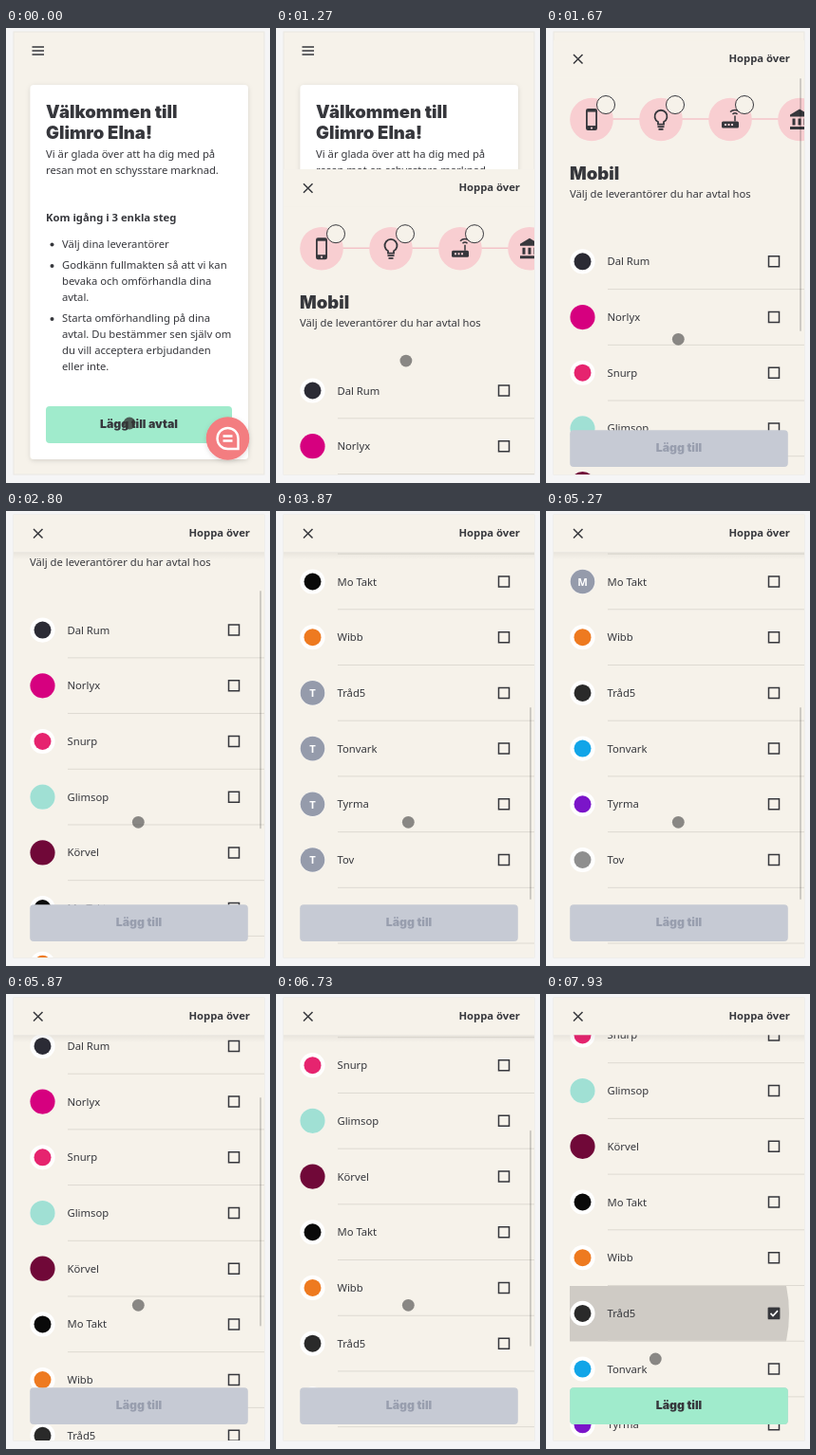
An HTML page for the animation above (8 s loop, 278x480 px).

```html
<!DOCTYPE html>
<html lang="sv">
<head>
<meta charset="utf-8">
<title>Lägg till avtal</title>
<style>
  html, body { margin: 0; width: 100%; height: 100%; overflow: hidden; background: #f5f5f6; }
  svg { display: block; width: 100%; height: 100%; }
  text { font: 11.25px "Noto Sans", "Open Sans", sans-serif; fill: #36373c; }
  .bold { font-weight: 700; }
  .title { font: 900 18.5px Inter, sans-serif; }
  .action { font: 900 12.3px Inter, sans-serif; text-anchor: middle; }
  .letter { font-weight: 700; text-anchor: middle; fill: #fff; }
</style>
</head>
<body>
<svg viewBox="0 0 278 480">
  <defs>
    <clipPath id="screen"><rect x="8" y="4" width="264" height="467"/></clipPath>
    <clipPath id="rowClip"><rect x="25" y="-29" width="247" height="58.5"/></clipPath>
    <linearGradient id="shade" x2="0" y2="1">
      <stop stop-color="#000" stop-opacity=".06"/>
      <stop offset="1" stop-color="#000" stop-opacity="0"/>
    </linearGradient>
    <filter id="soft" x="-20%" y="-20%" width="140%" height="140%">
      <feDropShadow dx="0" dy="1.5" stdDeviation="2.5" flood-opacity=".13"/>
    </filter>
  </defs>
  <rect x="8" y="4" width="264" height="467" fill="#f6f2ea" stroke="#e9e7e2"/>
  <g clip-path="url(#screen)">
    <g id="welcome"></g>
    <g id="picker">
      <rect x="8" y="4" width="264" height="467" fill="#f6f2ea"/>
      <g id="content"></g>
      <rect id="bar" x="267" width="2" rx="1" fill="#000" fill-opacity=".16"/>
      <g id="header"></g>
      <g id="footer"></g>
    </g>
  </g>
  <circle id="cursor" r="6.4" fill="#333"/>
</svg>
<script>
const LOOP = 8000, PITCH = 58.7, FIRST_ROW = 237.3, CHOSEN = 7, MAX_SCROLL = 456.3;
const INK = '#36373c', PAPER = '#f6f2ea', MINT = '#a0ebcc', PINK = '#f8ced1', RULE = '#dedad2';
const $ = id => document.getElementById(id);

function add(parent, tag, attrs = {}, text) {
  const el = document.createElementNS('http://www.w3.org/2000/svg', tag);
  for (const k in attrs) el.setAttribute(k, attrs[k]);
  if (text) el.textContent = text;
  return parent.appendChild(el);
}
const label = (parent, x, y, text, cls = '') => add(parent, 'text', { x, y, class: cls }, text);
const box = (parent, x, y, width, height, fill, rx = 0) =>
  add(parent, 'rect', { x, y, width, height, fill, rx });
const disc = (parent, cx, cy, r, fill) => add(parent, 'circle', { cx, cy, r, fill });
const line = (parent, d, stroke = INK, width = 1.5) =>
  add(parent, 'path', { d, stroke, 'stroke-width': width, fill: 'none' });
const move = (el, x, y) => el.setAttribute('transform', `translate(${x} ${y})`);
function group(parent, x = 0, y = 0) {
  const g = add(parent, 'g');
  move(g, x, y);
  return g;
}

const steps = [
  ['Välj dina leverantörer'],
  ['Godkänn fullmakten så att vi kan', 'bevaka och omförhandla dina', 'avtal.'],
  ['Starta omförhandling på dina', 'avtal. Du bestämmer sen själv om',
   'du vill acceptera erbjudanden', 'eller inte.'],
];

function buildWelcome(g) {
  line(g, 'M27.5 20h12.5M27.5 24h12.5M27.5 28h12.5', INK, 1.4);
  box(g, 25.5, 60, 229.5, 395, '#fff', 4).setAttribute('filter', 'url(#soft)');
  label(g, 42, 95, 'Välkommen till', 'title');
  label(g, 42, 117, 'Glimro Elna!', 'title');
  label(g, 42, 137, 'Vi är glada över att ha dig med på');
  label(g, 42, 154, 'resan mot en schysstare marknad.');
  label(g, 42, 204, 'Kom igång i 3 enkla steg', 'bold');
  let y = 232;
  for (const step of steps) {
    disc(g, 48.5, y - 3.5, 2, INK);
    for (const text of step) {
      label(g, 59, y, text);
      y += 16.8;
    }
    y += 5.6;
  }
  box(g, 42, 399, 196, 39, MINT, 4);
  label(g, 140, 422, 'Lägg till avtal', 'action');
  const chat = group(g, 233.5, 433);
  disc(chat, 0, 0, 22.8, '#f37d80').setAttribute('filter', 'url(#soft)');
  line(chat, 'M11 11H0A11 11 0 1 1 11 0ZM-5 -2.5H5M-5 2.5H5', '#fff', 2.4);
}

const icons = [
  function phone(g) {
    box(g, -6, -11.5, 12, 23, INK, 2.2);
    box(g, -4.2, -8, 8.4, 14.5, PINK);
    disc(g, 0, 9, 1.1, PINK);
  },
  function bulb(g) {
    line(g, 'M-3 5V2.5A6.5 6.5 0 1 1 3 2.5V5ZM-3.5 7.5H3.5M-2.5 10.2H2.5', INK, 1.8);
  },
  function router(g) {
    box(g, -9, 2, 18, 7, INK, 1.5);
    line(g, 'M5 2V-4M2.5 -5.5A3.6 3.6 0 0 1 7.5 -5.5M0 -8A7 7 0 0 1 10 -8');
    line(g, 'M-6 5.5H3', PINK, 2).setAttribute('stroke-dasharray', '2 1.5');
  },
  function bank(g) {
    add(g, 'path', { d: 'M-10 -5L0 -11L10 -5V-3H-10Z', fill: INK });
    line(g, 'M-6 -1V6M0 -1V6M6 -1V6M-10 9H10', INK, 3);
  },
];

const BADGE = 13.1, SMALL = 9;
const providers = [
  ['Dal Rum', '#2b2b35', SMALL],
  ['Norlyx', '#d6007f', BADGE],
  ['Snurp', '#e6246f', SMALL],
  ['Glimsop', '#a0e0d4', BADGE],
  ['Körvel', '#700838', BADGE],
  ['Mo Takt', '#0a0a0a', SMALL],
  ['Wibb', '#ee7a20', SMALL],
  ['Tråd5', '#2a2a2a', SMALL],
  ['Tonvark', '#12a5e8', SMALL],
  ['Tyrma', '#7b15c9', SMALL],
  ['Tov', '#8f8f8f', SMALL],
];
// the last badges load late, one of them reloads
const isLoading = (i, t) => i > 6 ? t < 4440 : i === 5 && t > 5100 && t < 5600;
let ripple, tick;

function buildRow(row, [name, color, r], i) {
  if (i === CHOSEN) {
    const clip = add(row, 'g', { 'clip-path': 'url(#rowClip)' });
    ripple = disc(clip, 116, 0, 0, '#000');
    ripple.setAttribute('fill-opacity', .16);
  }
  disc(row, 38.5, 0, BADGE, '#fff');
  disc(row, 38.5, 0, r, color);
  const initial = group(row);
  disc(initial, 38.5, 0, BADGE - .3, '#959bab');
  label(initial, 38.5, 4.2, name[0], 'letter');
  label(row, 64.5, 4, name);
  line(row, 'M234.5 -5.5h11v11h-11z');
  line(row, 'M65 29.3H272', RULE, 1);
  if (i === CHOSEN) {
    tick = group(row);
    box(tick, 233.8, -6.2, 12.4, 12.4, INK, 1);
    line(tick, 'M236.5 0L239 2.6L244 -2.8', '#fff', 1.6);
  }
  return initial;
}

function buildContent(g) {
  line(g, 'M48 87H272', '#f4c3c8');
  icons.forEach((draw, i) => {
    const topic = group(g, 48 + 73 * i, 87.5);
    disc(topic, 0, 0, 22.8, PINK);
    draw(topic);
    disc(topic, 15, -15.5, 9.5, PAPER).setAttribute('stroke', INK);
  });
  label(g, 25, 150.5, 'Mobil', 'title');
  label(g, 25, 170, 'Välj de leverantörer du har avtal hos');
  const initials = providers.map((p, i) => buildRow(group(g, 0, FIRST_ROW + PITCH * i), p, i));
  line(g, `M65 ${FIRST_ROW + PITCH * providers.length + 29.3}H272`, RULE, 1);
  return initials;
}

function button(parent, fill, color) {
  const g = group(parent);
  box(g, 25.2, 415.2, 229.6, 38.8, fill, 4);
  label(g, 140, 438, 'Lägg till', 'action').style.fill = color;
  return g;
}

buildWelcome($('welcome'));
const initials = buildContent($('content'));
const shadow = box($('header'), 8, 43, 264, 8, 'url(#shade)');
box($('header'), 8, 4, 264, 39.3, PAPER);
line($('header'), 'M29 19l9.5 9.5M38.5 19L29 28.5');
label($('header'), 192.5, 27.3, 'Hoppa över', 'bold');
button($('footer'), '#c6cad4', '#989eae');
const active = button($('footer'), MINT, INK);

const linear = p => p;
const smooth = p => p * p * (3 - 2 * p);
const easeOut = p => 1 - (1 - p) ** 4;
const ramp = (t, start, length, ease = linear) =>
  ease(Math.min(1, Math.max(0, (t - start) / length)));

function scrollAt(t) {
  const down = 115 * ramp(t, 2330, 800, easeOut) + 430 * ramp(t, 3600, 800, easeOut);
  const up = 350 * ramp(t, 5270, 860, smooth);
  const back = 205 * ramp(t, 6130, 800, smooth);
  return Math.min(MAX_SCROLL, down) - up + back;
}

// the scroll bar shows at once and fades when its time is over
const pulse = (t, from, to) => ramp(t, from - 70, 70) - ramp(t, to, 250);

function render(t) {
  const scroll = scrollAt(t);
  move($('picker'), 0, 467 * (1 - ramp(t, 1000, 1070, easeOut)));
  move($('content'), 0, -scroll);
  shadow.style.opacity = Math.min(1, scroll / 30);

  $('bar').setAttribute('y', 44 + .357 * scroll);
  $('bar').setAttribute('height', 267 - .14 * scroll);
  $('bar').style.opacity =
    pulse(t, 1600, 1800) + pulse(t, 2400, 3150) + pulse(t, 3650, 4650) + pulse(t, 5270, 7280);

  initials.forEach((el, i) => { el.style.display = isLoading(i, t) ? '' : 'none'; });
  ripple.setAttribute('r', 140 * ramp(t, 7650, 280));
  tick.style.display = t >= 7730 ? '' : 'none';
  active.style.opacity = ramp(t, 7720, 180);

  const toList = ramp(t, 870, 600, smooth);
  const toRow = ramp(t, 6780, 290, smooth);
  const toButton = ramp(t, 7720, 210, smooth);
  move($('cursor'), 130 + 9.3 * toList - 23 * toRow - toButton,
    417 - 88.7 * toList + 8.7 * toRow + 48 * toButton);
  $('cursor').style.opacity = t < 530 ? .78 : .56;
}

const start = performance.now();
(function frame() {
  render((performance.now() - start) % LOOP);
  requestAnimationFrame(frame);
})();
</script>
</body>
</html>
```
